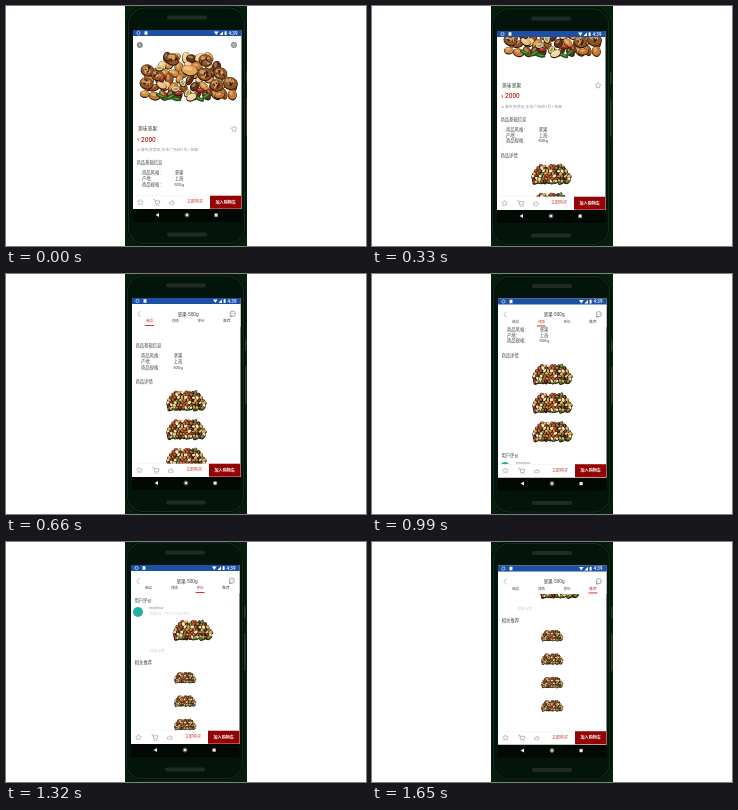
An HTML page with a canvas that plays this animation: 360x240 px, repeating every 1.98 s.

```html
<!DOCTYPE html>
<html lang="zh">
<head>
<meta charset="utf-8">
<style>
html, body { margin: 0; width: 100%; height: 100%; overflow: hidden; background: #fff; }
canvas { display: block; width: 360px; height: 240px; }
</style>
</head>
<body>
<canvas id="stage"></canvas>
<script>
const canvas = document.getElementById('stage');
const dpr = window.devicePixelRatio || 1;
canvas.width = 360 * dpr;
canvas.height = 240 * dpr;
const c = canvas.getContext('2d');

const STEP = 330;
// Hand-held camera offset, scroll position and active tab (-1: no header)
const poses = [
  { dx: 1, dy: 0, scroll: 0, tab: -1 },
  { dx: -1, dy: 1, scroll: 44.5, tab: -1 },
  { dx: 0, dy: 0, scroll: 85, tab: 0 },
  { dx: 0, dy: 0.5, scroll: 112, tab: 1 },
  { dx: -1, dy: -1, scroll: 233.5, tab: 2 },
  { dx: 0, dy: -0.5, scroll: 276, tab: 3 }
];

const GRAY = '#9aa3a0', INK = '#3c4642', RED = '#c3251d';

function text(s, x, y, size = 4.3, color = INK, align = 'left', weight = 400) {
  c.font = `${weight} ${size}px Roboto, "Noto Sans CJK SC", "Noto Sans CJK", sans-serif`;
  c.textAlign = align;
  c.textBaseline = 'middle';
  c.fillStyle = color;
  c.fillText(s, x, y);
}

function rect(x, y, w, h, color, r = 0) {
  c.fillStyle = color;
  c.beginPath();
  c.roundRect(x, y, w, h, r);
  c.fill();
}

function ellipse(x, y, rx, ry, color, angle = 0) {
  c.fillStyle = color;
  c.beginPath();
  c.ellipse(x, y, rx, ry, angle, 0, 7);
  c.fill();
}

function ring(x, y, r, color, width = 0.7) {
  c.strokeStyle = color;
  c.lineWidth = width;
  c.beginPath();
  c.arc(x, y, r, 0, 7);
  c.stroke();
}

function path(points, color, width = 0.7, filled = false) {
  c.beginPath();
  points.forEach(([x, y]) => c.lineTo(x, y));
  if (filled) {
    c.fillStyle = color;
    c.fill();
  } else {
    c.strokeStyle = color;
    c.lineWidth = width;
    c.stroke();
  }
}

function star(x, y, r) {
  const pts = [];
  for (let i = 0; i <= 10; i++) {
    const a = i * Math.PI / 5 - Math.PI / 2, d = i % 2 ? r * 0.48 : r;
    pts.push([x + d * Math.cos(a), y + d * Math.sin(a)]);
  }
  path(pts, GRAY, 0.6);
}

function randomizer(seed) {
  return () => (seed = seed * 16807 % 2147483647) / 2147483647;
}

function nut(x, y, rx, ry, color, angle) {
  ellipse(x, y + 0.6, rx + 0.5, ry + 0.5, '#2a1408', angle);
  ellipse(x, y, rx, ry, color, angle);
  ellipse(x - rx * 0.2, y - ry * 0.3, rx * 0.55, ry * 0.35, '#fff3d066', angle);
}

function walnut(x, y, r, rnd) {
  nut(x, y, r, r * 0.85, '#8f5526', 0.3);
  for (let i = 0; i < 10; i++) {
    const a = rnd() * 7, d = rnd() * r * 0.7;
    ellipse(x + d * Math.cos(a), y + d * Math.sin(a) * 0.8, r * 0.28, r * 0.12,
      i % 2 ? '#3a1c0b' : '#d9a565', rnd() * 3);
  }
}

function leaf(x, y, angle, size = 5) {
  ellipse(x, y, size, size * 0.4, '#1d5a22', angle);
  ellipse(x, y - 0.4, size * 0.7, size * 0.12, '#69a03f', angle);
}

// Large banner pile, about 98 by 54
function banner(x, y) {
  const rnd = randomizer(71);
  c.save();
  c.translate(x, y);
  const tones = ['#c47a32', '#dfa557', '#9a5019', '#f0cb88', '#5e2f10', '#cf8d42'];
  for (let row = 0; row < 6; row++) {
    const half = 20 + 24 * Math.sin(row * 0.32), n = 6 + row;
    for (let i = 0; i < n; i++) {
      const px = 49 + half * (2 * i / (n - 1) - 1) + rnd() * 3 - 1.5;
      nut(px, 6 + row * 7.4 + rnd() * 3, 4 + rnd() * 1.8, 2.8 + rnd() * 1.3,
        tones[Math.floor(rnd() * 6)], rnd() * 3);
    }
  }
  [[8, 20, 6.5], [7, 33, 6.5], [18, 25, 6], [33, 9, 6.5], [66, 10, 6.5], [65, 24, 7],
    [81, 23, 6.5], [91, 33, 7], [77, 35, 6.5]].forEach(p => walnut(...p, rnd));
  nut(50, 20, 8, 5, '#e2a658', 0.2);
  nut(22, 35, 5, 3, '#e5bf7e', 0.5);
  [[20, 18], [43, 33], [48, 43], [36, 39]].forEach(([px, py], i) => {
    nut(px, py, 3.6, 2.4, '#e6cc9c', i);
    ellipse(px, py, 2.5, 1.1, '#86a33c', i);
  });
  [[61, 40], [70, 42], [23, 28], [39, 43]].forEach(([px, py], i) =>
    nut(px, py, 3.6, 2, '#a62c1c', i));
  [[21, 46, 0.4], [31, 47, -0.5], [37, 49, 0.2], [60, 49, 0.4], [67, 46, -0.6]]
    .forEach(p => leaf(...p));
  nut(52, 47, 5, 3.2, '#f2d59b', -0.4);
  nut(80, 45, 5, 3, '#bd7629', -0.2);
  c.restore();
}

// Thumbnail pile centred on (x, y)
function pile(x, y, w) {
  const rnd = randomizer(23);
  c.save();
  c.translate(x, y);
  c.scale(w / 40, w / 40);
  ellipse(0, 2, 16, 7, '#3a1e0e');
  const tones = ['#c87c30', '#eec177', '#8c4a1a', '#f7e2b0', '#a8381c', '#5f7a2c', '#d99a4c', '#42210f'];
  for (let row = 0; row < 7; row++) {
    const half = 9.5 + 8.5 * Math.sin(row * 0.35), n = 7 + row;
    for (let i = 0; i < n; i++) {
      nut(half * (2 * i / (n - 1) - 1) + rnd() - 0.5, -8.5 + row * 2.6 + rnd(),
        1.5 + rnd() * 0.9, 1.1 + rnd() * 0.5, tones[Math.floor(rnd() * 8)], rnd() * 3);
    }
  }
  [[-12, 8.5, 0.3], [2, 9, -0.2], [9, 8.5, 0.2]].forEach(p => leaf(...p, 2.6));
  c.restore();
}

function summary() {
  banner(132.5, 44);
  text('美味坚果', 130.7, 123, 4.9);
  star(227, 123, 3.2);
  text('¥', 130.2, 134, 4, RED);
  text('2000', 134, 133.6, 6.5, RED, 'left', 500);
  text('上海市,柳浪区,丰禾广场001号 | 包邮', 129.5, 144, 3.9, '#929997');
}

function details() {
  text('商品基础信息', 129.5, 157);
  [['商品风格：', '坚果'], ['产地：', '上海'], ['商品规格：', '500g']].forEach(([key, value], i) => {
    text(key, 135, 167 + i * 5.8);
    text(value, 172, 167 + i * 5.8, 4.3, INK, 'center');
  });

  text('商品详情', 129.5, 193);
  for (let i = 0; i < 3; i++) pile(180, 211.5 + i * 28.7, 40);

  text('用户评价', 129.5, 293);
  text('· · ·', 222, 293, 4, '#c2c8c6', 'center');
  ellipse(133, 304.5, 5, 5, '#23b39c');
  text('mianhua', 144, 300.5, 3.7, '#7c8583');
  text('坚果很香, 包装完好, 值得购买', 144, 306.5, 3.2, '#d3d8d6');
  pile(187.5, 322.5, 40);
  text('回复 点赞', 145.5, 343.5, 3.4, '#c5cbc9');

  text('相关推荐', 129.8, 355.3);
  for (let i = 0; i < 4; i++) pile(180, 370 + i * 23.4, 22);
}

function chat(x, y, color) {
  ring(x, y, 2.6, color);
  path([[x - 2, y + 1.8], [x - 2.4, y + 3], [x - 0.5, y + 2.5]], color);
  for (let i = -1; i < 2; i++) ellipse(x + i * 1.2, y, 0.35, 0.35, color);
}

function header(tab) {
  rect(126, 30, 108.5, 22.5, '#fff');
  path([[134.5, 37], [131.8, 40], [134.5, 43]], GRAY);
  text('坚果-500g', 182, 40.3, 4.7, INK, 'center');
  chat(226.7, 39.7, '#78817e');
  ['商品', '详情', '评论', '推荐'].forEach((name, i) => {
    const x = 143.5 + i * 25.8;
    text(name, x, 47.2, 3.6, i === tab ? RED : INK, 'center');
    if (i === tab) rect(x - 4.5, 51, 9, 0.9, RED);
  });
}

function roundButtons() {
  ellipse(132.8, 39, 3, 3, '#858c8a');
  path([[133.4, 37.5], [132, 39], [133.4, 40.5]], '#fff', 0.6);
  ellipse(227, 39, 3, 3, '#858c8a');
  ring(227, 39, 1.4, '#fff', 0.5);
}

function statusBar() {
  rect(126, 24, 108.5, 6, '#1b50a5');
  ring(131.5, 27, 1.6, '#e9f0fa');
  rect(137.5, 25.2, 3, 3.6, '#f2f6fc', 0.4);
  path([[207, 25.6], [211.6, 25.6], [209.3, 29]], '#fff', 0, true);
  path([[212.5, 29], [216, 29], [216, 25.3]], '#fff', 0, true);
  rect(217.6, 25.2, 2, 3.8, '#fff', 0.3);
  text('4:39', 226, 27.2, 4.5, '#fff', 'center', 500);
}

function bottomBar() {
  rect(126, 189.7, 108.5, 13.3, '#fff');
  rect(126, 189.7, 77, 0.4, '#dce1df');
  star(133.5, 196.3, 3);
  path([[146.3, 193.5], [147.6, 193.5], [148.8, 198], [152, 198], [153, 194.8], [148, 194.8]], GRAY);
  ellipse(149.2, 199.5, 0.6, 0.6, GRAY);
  ellipse(151.8, 199.5, 0.6, 0.6, GRAY);
  path([[162.5, 196], [164.5, 196], [165.3, 194.5], [165.8, 196], [167.2, 196],
    [166.8, 198.3], [162.5, 198.3], [162.5, 196]], GRAY, 0.6);
  text('立即购买', 188, 196.3, 4, '#c0402c', 'center');
  rect(203, 189.7, 31.5, 13, '#950404');
  text('加入购物车', 218.7, 196.3, 4.1, '#fff', 'center', 700);
}

function phone() {
  rect(238.5, 65, 2, 12, '#26402c', 1);
  rect(238.5, 92, 2, 38, '#26402c', 1);
  rect(120, 0.5, 119, 238.5, '#020a04', 17);
  rect(121, 1.5, 117, 236.5, '#20342a', 16);
  rect(121.7, 2.2, 115.6, 235.1, '#03140a', 15.5);
  rect(160, 9.5, 40, 4, '#1f2c24', 2);
  rect(160, 226.5, 40, 4, '#1f2c24', 2);
  rect(126, 203, 108.5, 13, '#020804');
  path([[152, 207], [152, 211], [148.5, 209]], '#e8ecea', 0, true);
  ring(180, 209, 2, '#aab0ad', 0.6);
  ellipse(180, 209, 1.3, 1.3, '#e8ecea');
  rect(207.5, 207.5, 3.2, 3.2, '#e8ecea');
  rect(126, 24, 108.5, 179, '#fff');
}

function draw({ dx, dy, scroll, tab }) {
  c.setTransform(dpr, 0, 0, dpr, 0, 0);
  rect(0, 0, 360, 240, '#fff');
  rect(119, 0, 122, 240, '#03200a');
  c.save();
  c.beginPath();
  c.rect(119, 0, 122, 240);
  c.clip();
  c.translate(dx, dy);
  phone();
  c.save();
  c.beginPath();
  c.rect(126, 30, 108.5, 160);
  c.clip();
  c.translate(0, -scroll);
  if (tab < 0) summary();
  details();
  c.restore();
  if (tab >= 0) header(tab);
  else if (scroll === 0) roundButtons();
  statusBar();
  bottomBar();
  c.restore();
}

const start = performance.now();
let shown = -1;

function tick() {
  const index = Math.floor((performance.now() - start) / STEP) % poses.length;
  if (index !== shown) draw(poses[shown = index]);
  requestAnimationFrame(tick);
}
tick();
</script>
</body>
</html>
```
